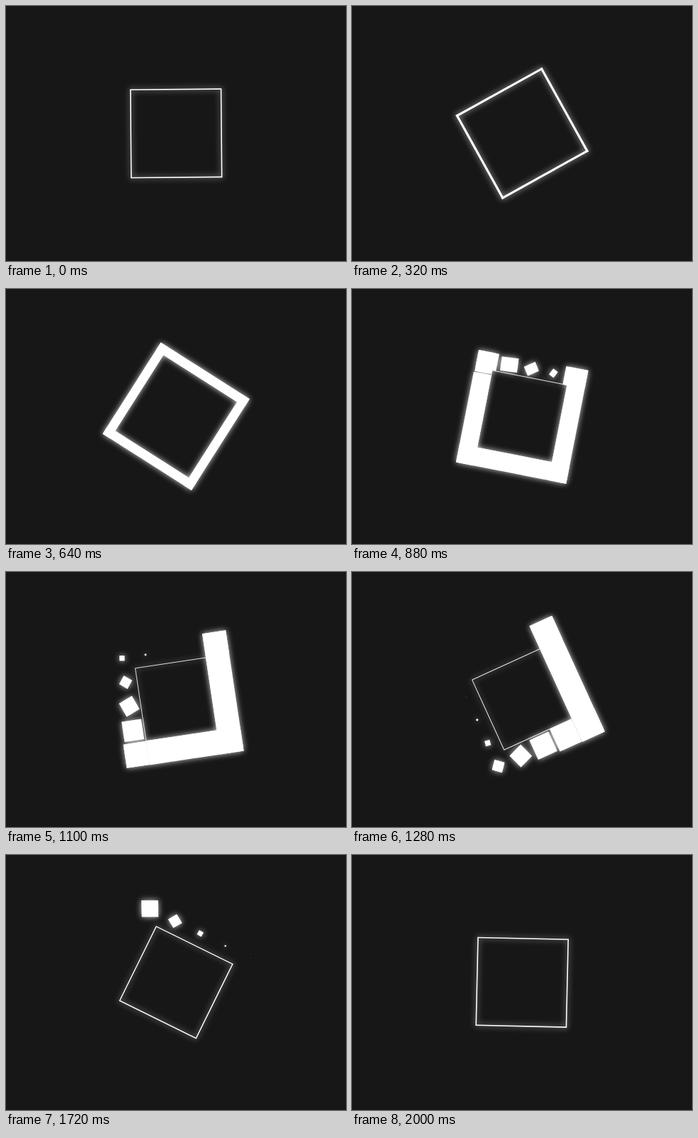
An HTML page with a canvas for the animation above (2020 ms loop, 480 by 360 pixels).

```html
<!DOCTYPE html>
<html lang="en">
<head>
<meta charset="utf-8">
<title>Unravelling square</title>
<style>
  html, body { margin: 0; width: 100%; height: 100%; overflow: hidden; background: #171717; }
  canvas { display: block; }
</style>
</head>
<body>
<canvas id="stage" width="480" height="360"></canvas>
<script>
const W = 480, H = 360;
const LOOP = 2020, STEP = 20;
const PITCH = 25.25, ASPECT = 0.972;
const GROW = 980;                        // time for the border to reach full thickness
const LEAVE = 630, FADE = 480, GAP = 61; // first tile's start, a tile's duration, time between tiles
const RAD = Math.PI / 180;

const stage = document.getElementById('stage').getContext('2d');
const layer = document.createElement('canvas');
layer.width = W;
layer.height = H;
const ink = layer.getContext('2d');

// The 16 border cells of a 5 by 5 grid, in the order they come loose
const tiles = [];
for (let i = 0, x = 2, y = 2; i < 16; i++) {
  if (i < 4) y--;
  else if (i < 8) x--;
  else if (i < 12) y++;
  else x++;
  tiles.push({ x, y, start: LEAVE + i * GAP });
}

function box(cx, cy, w, h) {
  ink.fillRect(cx - w / 2, cy - h / 2, w, h);
}

function drawTile(tile, t, pitch, band) {
  const u = Math.max(0, (t - tile.start) / FADE);
  if (u >= 1) return;
  const scale = Math.cos(u * Math.PI / 2) ** 3;
  const spin = -235 * Math.max(0, u - 0.25);
  const inset = (pitch - band) / 2;
  const sx = Math.trunc(tile.x / 2), sy = Math.trunc(tile.y / 2);
  const long = u ? pitch : pitch + 0.8;  // resting tiles overlap to hide seams

  ink.save();
  ink.translate(tile.x * pitch, tile.y * pitch);
  if (sx && sy) {
    ink.rotate(spin * RAD);
    ink.scale(scale, scale);
    box(sx * inset, 0, band, pitch);
    box(0, sy * inset, pitch, band);
  } else {
    ink.translate(sx * inset, sy * inset);
    ink.rotate(spin * RAD);
    ink.scale(scale, scale);
    box(0, 0, sx ? band : long, sx ? long : band);
  }
  ink.restore();
}

function draw(t) {
  const turn = t / LOOP;
  const pitch = PITCH * (1 + turn * 2 / 3);
  const band = pitch * Math.min(1, t / GROW) ** 2;
  const line = 1.2 + 0.4 * Math.cos(turn * 2 * Math.PI);
  const side = 5 * pitch - 2 * band + line;

  ink.clearRect(0, 0, W, H);
  ink.save();
  ink.translate(240.2, 179.8);
  ink.rotate((-0.5 - 180 * turn) * RAD);
  ink.scale(1, ASPECT);
  ink.fillStyle = ink.strokeStyle = '#fff';
  ink.lineWidth = line;
  ink.strokeRect(-side / 2, -side / 2, side, side);
  tiles.forEach(tile => drawTile(tile, t, pitch, band));
  ink.restore();

  stage.fillStyle = '#171717';
  stage.fillRect(0, 0, W, H);
  stage.save();
  stage.shadowColor = 'rgba(255, 255, 255, 0.8)';
  stage.shadowBlur = 8;
  stage.drawImage(layer, 0, 0);
  stage.restore();
}

const start = performance.now();
function tick() {
  const t = (performance.now() - start) % LOOP;
  draw(Math.floor(t / STEP) * STEP);
  requestAnimationFrame(tick);
}
tick();
</script>
</body>
</html>
```
